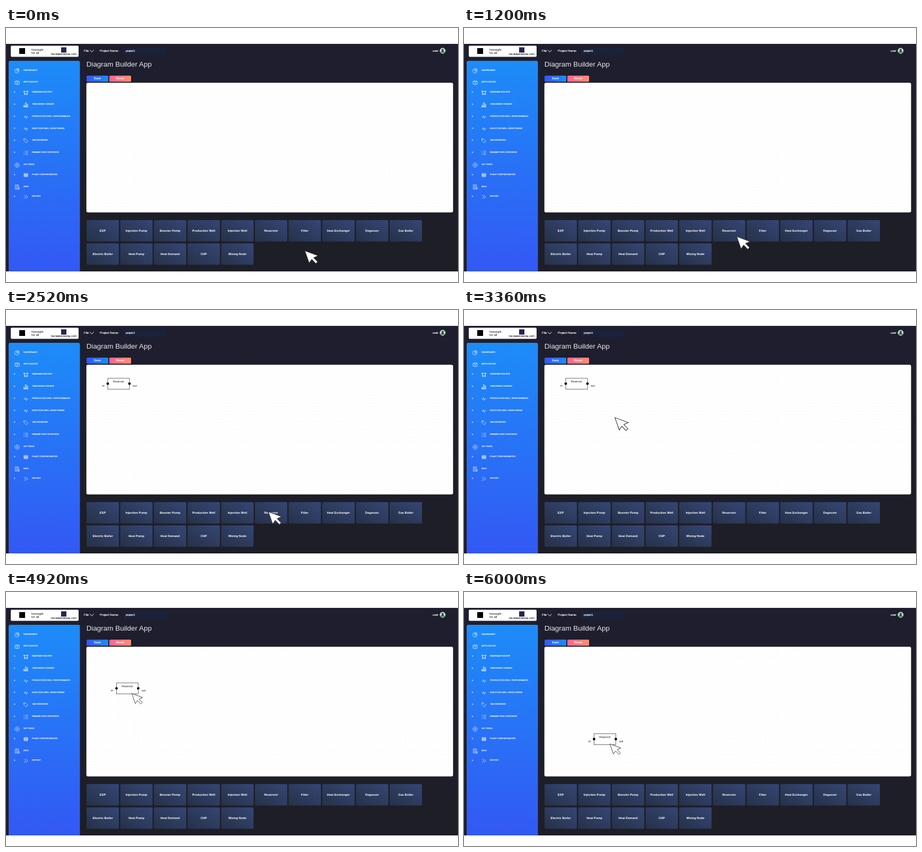
These frames come from a looping animation (853x480 px, 6.06 s). An HTML page:

```html
<!DOCTYPE html>
<html lang="en">
<head>
<meta charset="utf-8">
<title>Diagram Builder App</title>
<style>
  html, body { margin: 0; width: 100%; height: 100%; overflow: hidden; background: #fff; }
  svg { display: block; width: 853px; height: 480px; font-family: "Liberation Sans", Arial, sans-serif; }
  .menu { font-size: 4.08px; fill: #fff; stroke: #fff; stroke-width: .15px; }
  .header { font-size: 5.65px; fill: #fff; stroke: #fff; stroke-width: .15px; }
  .label { font-size: 5.7px; font-weight: bold; fill: #fff; text-anchor: middle; }
  .icon { fill: none; stroke: #fff; stroke-width: .8px; opacity: .85; }
</style>
</head>
<body>
<svg viewBox="0 0 853 480">
  <defs>
    <linearGradient id="page" x2="0" y2="1"><stop stop-color="#1e1e2f"/><stop offset="1" stop-color="#1e1e26"/></linearGradient>
    <linearGradient id="side" x2="0" y2="1"><stop stop-color="#1d8cf8"/><stop offset="1" stop-color="#3358f4"/></linearGradient>
    <linearGradient id="tile" x1="1" x2="0" y2="1"><stop stop-color="#344675"/><stop offset="1" stop-color="#263148"/></linearGradient>
    <linearGradient id="save"><stop stop-color="#3358f4"/><stop offset="1" stop-color="#1d8cf8"/></linearGradient>
    <linearGradient id="reset"><stop stop-color="#ff6491"/><stop offset="1" stop-color="#ff8d72"/></linearGradient>
    <pattern id="dots" x="152" y="104" width="5" height="5" patternUnits="userSpaceOnUse">
      <circle cx="2.5" cy="2.5" r=".4" fill="#d4d4d4"/>
    </pattern>
  </defs>

  <rect y="30" width="853" height="430" fill="url(#page)"/>

  <rect x="9" y="33.5" width="128" height="21" rx="2" fill="#fff"/>
  <rect x="25" y="38" width="11" height="11" fill="#000"/>
  <g font-size="5.9" fill="#111">
    <text x="48" y="43">foresight</text>
    <text x="48" y="49">for all</text>
  </g>
  <rect x="104" y="36.5" width="10" height="10" fill="#2b2350"/>
  <text x="109" y="50.5" font-size="3.7" font-weight="bold" text-anchor="middle" fill="#111">THE PAIRED DIGITAL COPY</text>

  <g class="header">
    <text x="147" y="45">File</text>
    <text x="177" y="45">Project Name:</text>
    <text x="805" y="45">user</text>
  </g>
  <path d="M158 41.5l3.8 3.8 3.8-3.8" fill="none" stroke="#fff"/>
  <rect x="221" y="36" width="82" height="15" rx="2" fill="#1a2138"/>
  <text x="226" y="45.2" class="header" style="font-size:4.9px">project1</text>
  <circle cx="824" cy="43" r="5.2" fill="#cfe8dc" stroke="#6fae92"/>
  <circle cx="824" cy="41.8" r="2.3" fill="#4a4444"/>
  <path d="M820.5 46.5a3.5 3 0 0 1 7 0z" fill="#4a4444"/>

  <path d="M5 460V65a3 3 0 0 1 3-3H136.5a3 3 0 0 1 3 3V460z" fill="url(#side)"/>
  <g id="menu"></g>

  <text x="151.7" y="73.3" font-size="13.45" fill="#fff" fill-opacity=".9">Diagram Builder App</text>
  <rect x="152" y="90" width="41" height="11.5" rx="1.5" fill="url(#save)"/>
  <rect x="195" y="90" width="41" height="11.5" rx="1.5" fill="url(#reset)"/>
  <text x="172.5" y="97.3" class="label">Save</text>
  <text x="215.5" y="97.3" class="label">Reset</text>
  <rect x="151.7" y="103.4" width="692" height="245" rx="3" fill="#fff"/>
  <rect x="151.7" y="103.4" width="692" height="245" rx="3" fill="url(#dots)"/>
  <g id="tiles"></g>

  <g id="node">
    <rect x="192" y="129" width="41" height="20.8" fill="#fff" stroke="#444" stroke-width=".8"/>
    <circle cx="192" cy="139.2" r="2.4"/>
    <circle cx="233" cy="139.2" r="2.4"/>
    <g id="nodeText" fill="#222">
      <text x="212.4" y="137" font-size="4.95" text-anchor="middle">Reservoir</text>
      <text x="181.6" y="145" font-size="5.7">in</text>
      <text x="239.2" y="145" font-size="5.7">out</text>
    </g>
  </g>
  <path id="cursor" d="M-12.4-12.1L-4.2 11.3 .7 4.3 8.5 12.3 12 8.8 4.5 1.1 12.8-2.7z" fill="#fff" stroke="#333" stroke-width="1.1"/>
</svg>

<script>
const $ = id => document.getElementById(id);

// Icons are drawn around their own centre.
const icons = {
  pie: 'M-.5-3.5A4 4 0 1 0 3.5 .8H-.5zM1-4A3.6 3.6 0 0 1 4-.8H1z',
  box: 'M-4-2L0-3.5 4-2V3L0 4-4 3zM-4-2L0-.8 4-2M0-.8V4',
  graph: 'M-4-3h2v2h-2zM2-3h2v2h-2zM-2-2H2M-3-1L-2 3M3-1L2 3M-3 2h2v2h-2zM1 2h2v2h-2z',
  bars: 'M-4 4V1h1.6v3zM-1 4V-4H.6V4zM2 4V-1.5h1.6V4zM-4.5 4h9',
  pulse: 'M-4 .5h1.8L-.8-2.5 .8 3 2-.3h2.2',
  tag: 'M-4-3.5h3.5L4 1 .8 4-4-.5zM-2.7-2h.8',
  list: 'M-4-3h1.5M-1-3h5M-4 0h1.5M-1 0h5M-4 3h1.5M-1 3h5',
  gear: 'M-1.5-4h3L4-1.5v3L1.5 4h-3L-4 1.5v-3zM1.5 0A1.5 1.5 0 1 0-1.5 0 1.5 1.5 0 1 0 1.5 0',
  stack: 'M-3.5-3h7M-3.5-2h7M-3.5-.5h7M-3.5 .5h7M-3.5 2h7M-3.5 3h7M-3.5-3V3M3.5-3V3',
  page: 'M-3.5-4h6V4h-6zM2.5 1H4V4H2M-2-2h3M-2 0h3M-2 2h3',
  arrows: 'M-3.5-3.5L0 0-3.5 3.5M0-3.5L3.5 0 0 3.5'
};

const menu = [
  ['DASHBOARD', 79.5, 'pie', true], ['APPLICATION', 102, 'box', true],
  ['DIAGRAM BUILDER', 121, 'graph'], ['TIMESERIES VIEWER', 144, 'bars'],
  ['PRODUCTION WELL PERFORMANCE', 167, 'pulse'], ['INJECTION WELL MONITORING', 189.5, 'pulse'],
  ['TAG BROWSER', 212, 'tag'], ['PARAMETERS OVERVIEW', 235, 'list'],
  ['SETTINGS', 258, 'gear', true], ['PLANT CONFIGURATION', 277, 'stack'],
  ['INFO', 299.5, 'page', true], ['REPORT', 318, 'arrows']
];
$('menu').innerHTML = menu.map(([name, y, icon, top]) => `
  <path class="icon" d="${icons[icon]}" transform="translate(${top ? 21 : 37.5} ${y + 1})"/>
  ${top ? '' : `<circle class="icon" cx="16" cy="${y}" r=".9"/>`}
  <text class="menu" x="${top ? 33 : 49}" y="${y + 1.4}">${name}</text>`).join('');

const parts = ['ESP', 'Injection Pump', 'Booster Pump', 'Production Well', 'Injection Well',
  'Reservoir', 'Filter', 'Heat Exchanger', 'Degasser', 'Gas Boiler',
  'Electric Boiler', 'Heat Pump', 'Heat Demand', 'CHP', 'Mixing Node'];
$('tiles').innerHTML = parts.map((name, i) => {
  const x = 152 + 63.55 * (i % 10), y = i < 10 ? 363 : 407;
  return `<rect x="${x}" y="${y}" width="61" height="40.5" rx="2" fill="url(#tile)"/>
    <text class="label" x="${x + 30.5}" y="${y + 21.5}">${name}</text>`;
}).join('');

const LOOP = 6060, STEP = 60;
const ease = (t, start, end) => {
  const u = Math.min(1, Math.max(0, (t - start) / (end - start)));
  return (1 - Math.cos(Math.PI * u)) / 2;
};

function draw(now) {
  const t = Math.floor(now % LOOP / STEP) * STEP;
  const toTile = ease(t, 170, 1630), toNode = ease(t, 2370, 3830), drag = ease(t, 4380, 5820);
  const press = ease(t, 1720, 1860) - ease(t, 1980, 2120) + ease(t, 4000, 4200);
  const x = 576.3 - 61.5 * toTile - 284.3 * toNode + 55 * drag;
  const y = 433 - 33.5 * toTile - 240.5 * toNode + 138 * drag;

  $('cursor').setAttribute('transform', `translate(${x} ${y}) scale(${1 - .18 * press})`);
  $('node').setAttribute('transform', `translate(${53.5 * drag} ${138.8 * drag})`);
  $('node').style.display = t < 2100 ? 'none' : '';
  $('nodeText').style.filter = t < 4080 ? '' : 'blur(.4px)';
}

function tick() {
  draw(performance.now());
  requestAnimationFrame(tick);
}
tick();
</script>
</body>
</html>
```
